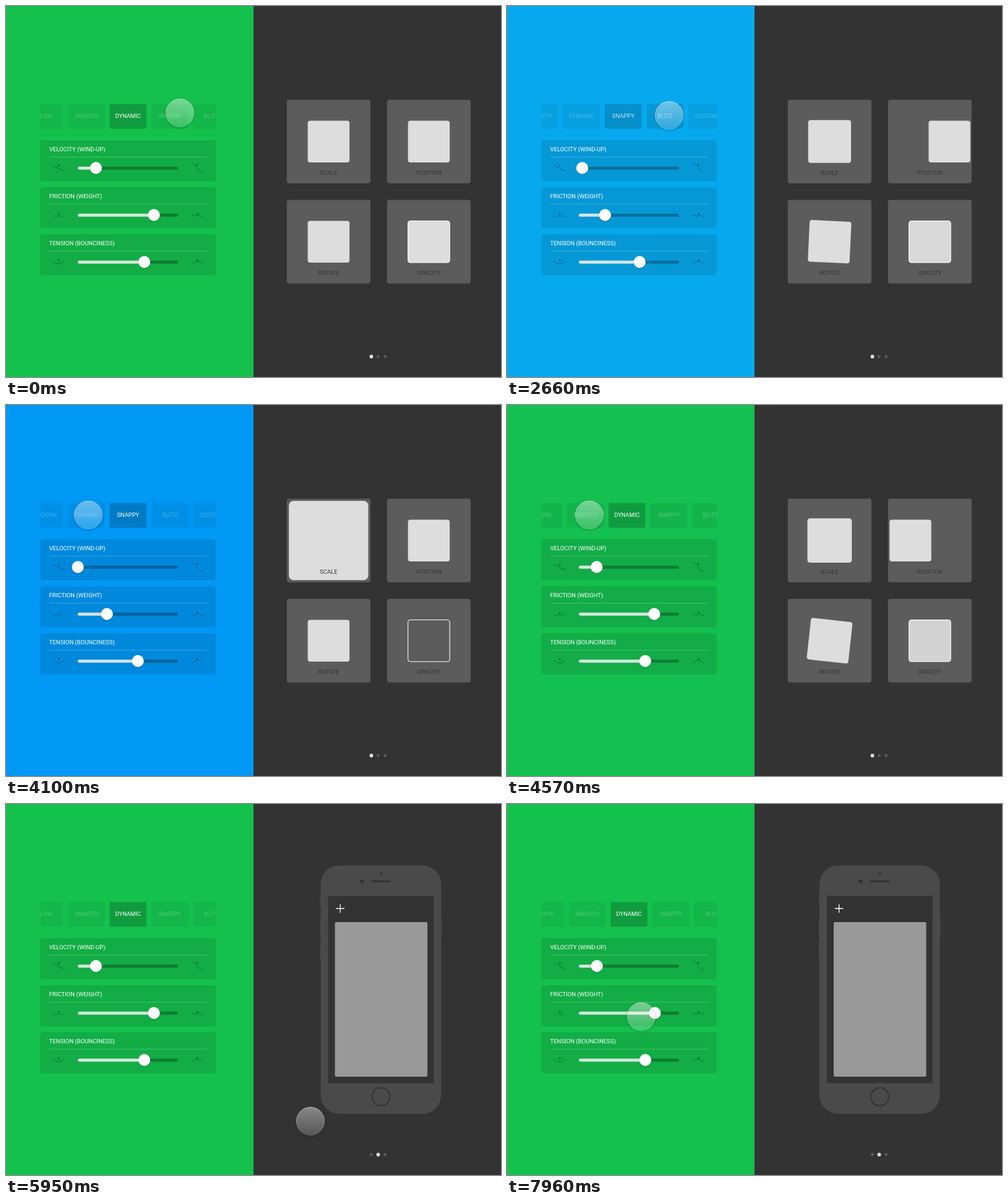
Animation of 800x600 px, one loop 8000 ms. Source, as an HTML page:

```html
<!DOCTYPE html>
<html lang="en">
<head>
<meta charset="utf-8">
<title>Spring presets</title>
<style>
html, body { margin: 0; width: 100%; height: 100%; overflow: hidden; background: #333; }
svg { display: block; width: 800px; height: 600px; }
text { font: 9.4px Roboto, Arial, sans-serif; }
.mid { text-anchor: middle; }
.icon { fill: none; stroke: #000; stroke-opacity: .36; stroke-width: .9; }
.icon circle { fill: #000; fill-opacity: .4; stroke: none; }
</style>
</head>
<body>
<svg id="stage" viewBox="0 0 800 600" xmlns="http://www.w3.org/2000/svg">
  <defs>
    <clipPath id="tabClip"><rect x="55.5" y="150" width="283.5" height="60"/></clipPath>
    <linearGradient id="glass" x1="0" y1="0" x2="0" y2="1">
      <stop offset="0" stop-color="#fff" stop-opacity=".42"/>
      <stop offset="1" stop-color="#fff" stop-opacity=".17"/>
    </linearGradient>
    <linearGradient id="rim" x1="0" y1="0" x2="0" y2="1">
      <stop offset="0" stop-color="#fff" stop-opacity=".5"/>
      <stop offset="1" stop-color="#fff" stop-opacity=".08"/>
    </linearGradient>
    <filter id="soft" x="-30%" y="-30%" width="160%" height="160%"><feGaussianBlur stdDeviation="1"/></filter>
  </defs>
  <rect width="800" height="600" fill="#333"/>
  <g id="cards"></g>
  <g id="phone">
    <path d="M504.5 150v16M504.5 184v30M504.5 221v29M700 184v30" stroke="#434343" stroke-width="2"/>
    <rect x="505" y="99.5" width="194.5" height="401.5" rx="30" fill="#4a4a4a"/>
    <rect x="517" y="148.5" width="170.7" height="303" fill="#333"/>
    <circle cx="603" cy="112.5" r="2.1" fill="#333"/>
    <circle cx="571.5" cy="125" r="3.3" fill="#333"/>
    <path d="M588 125h29" stroke="#333" stroke-width="3.2" stroke-linecap="round"/>
    <circle cx="602.3" cy="473.5" r="14.5" fill="none" stroke="#333" stroke-width="1.8"/>
    <rect id="sheet" rx="2" fill="#999"/>
    <path d="M529.8 169h13.6M536.6 162.2v13.6" stroke="#fff" stroke-width="1.3"/>
  </g>
  <g id="dots"></g>
  <rect id="panel" width="400" height="600"/>
  <g id="tabs" clip-path="url(#tabClip)"></g>
  <g id="sliders"></g>
  <g id="cursor">
    <circle cy="1.5" r="23" fill="none" stroke="#000" stroke-opacity=".22" stroke-width="1.5" filter="url(#soft)"/>
    <circle r="23" fill="url(#glass)"/>
    <circle r="22.5" fill="none" stroke="url(#rim)"/>
  </g>
</svg>
<script>
const LOOP = 8000, PITCH = 67.5, SQUARE = 67.5;
const $ = id => document.getElementById(id);

function add(parent, tag, attrs, text) {
  const el = document.createElementNS('http://www.w3.org/2000/svg', tag);
  set(el, attrs);
  if (text) el.textContent = text;
  parent.appendChild(el);
  return el;
}
function set(el, attrs) {
  for (const name in attrs) el.setAttribute(name, attrs[name]);
}
const mix = (a, b, k) => a + (b - a) * k;
const ease = k => k * k * (3 - 2 * k);

// Value of a stepped track: 0 before its start, last entry after its end.
function held(t, start, gap, values) {
  if (t < start) return 0;
  return values[Math.min(Math.floor((t - start) / gap), values.length - 1)];
}

const presets = {
  dynamic: { tab: 2, scroll: 0, knobs: [145.3, 239, 223.5], color: [20, 193, 77] },
  snappy: { tab: 3, scroll: 67.5, knobs: [116, 163, 213], color: [0, 152, 245] },
  blitz: { tab: 4, scroll: 90, knobs: [132.5, 149, 216.8], color: [26, 214, 221] }
};

// spring drives the demo squares, scroll the tab strip, blend the colours and sliders.
const snappyTracks = {
  spring: [.43, .95, 1.02, 1.02, 1.01, 1],
  scroll: [.275, .78, .96, .96, .99, 1],
  blend: [.21, .78, 1]
};
const switches = [
  { start: 1460, from: 'dynamic', to: 'snappy', x: [0, -1], ...snappyTracks },
  { start: 2660, from: 'snappy', to: 'blitz', x: [-1, 1],
    spring: [.97, 1.145, 1.02, .95, .99, 1.02, 1.005, 1], scroll: [.42, .9, 1], blend: [.33, .85, 1] },
  { start: 3540, from: 'blitz', to: 'snappy', x: [1, 0], ...snappyTracks },
  { start: 4370, from: 'snappy', to: 'dynamic', x: [0, -1],
    spring: [.15, .62, .93, 1.03, 1.02, 1.005, 1], scroll: [.16, .65, .95, 1], blend: [.16, .7, .985, 1] }
];

const moves = [
  { start: 90, steps: 2, gap: 120, to: [277, 176] },
  { start: 1810, steps: 4, gap: 110, to: [262, 177] },
  { start: 3070, steps: 4, gap: 100, to: [166, 178] },
  { start: 3900, steps: 3, gap: 100, to: [133, 178] },
  { start: 4680, steps: 4, gap: 100, to: [690, 508] },
  { start: 5160, steps: 10, gap: 87.7, to: [492, 513] },
  { start: 6040, steps: 4, gap: 86, to: [542, 174] },
  { start: 7520, steps: 6, gap: 88, to: [217, 344] }
];

const tabs = ['SLOW', 'SMOOTH', 'DYNAMIC', 'SNAPPY', 'BLITZ', 'CUSTOM'].map(name => {
  const group = add($('tabs'), 'g');
  return {
    group,
    box: add(group, 'rect', { x: -29.75, y: 158.5, width: 59.5, height: 40, rx: 2 }),
    label: add(group, 'text', { y: 181.4, class: 'mid', fill: '#fff' }, name)
  };
});

const icons = [
  ['M-9 -3C-3 -3 2 4 10 4', 'M-8 -7C0 -7 0 7 9 7', -4, -5],
  ['M-9 2h19', 'M-9 2q2 -3 4 -1t5 0t5 0t5 1', -1.5, -2],
  ['M-9 -1q9 8 18 0', 'M-9 3q9 -8 18 0', -3, -3]
];
const sliders = ['VELOCITY (WIND-UP)', 'FRICTION (WEIGHT)', 'TENSION (BOUNCINESS)'].map((name, i) => {
  const g = add($('sliders'), 'g', { transform: `translate(0 ${i * 76})` });
  add(g, 'rect', { x: 55.5, y: 217, width: 283.5, height: 66.5, rx: 3, 'fill-opacity': .1 });
  add(g, 'text', { x: 69.8, y: 235.2, fill: '#fff', style: 'font-size:9.5px' }, name);
  add(g, 'path', { d: 'M70 244.5H325', stroke: '#fff', 'stroke-opacity': .22 });
  [85, 309].forEach((x, side) => {
    const icon = add(g, 'g', { class: 'icon', transform: `translate(${x} 262)` });
    const line = add(icon, 'path', { d: icons[i][side] });
    if (i === 1 && side === 0) set(line, { 'stroke-dasharray': '2 1' });
    add(icon, 'circle', { cx: .3, cy: icons[i][2 + side], r: 1.4 });
  });
  add(g, 'rect', { x: 116, y: 259.8, width: 162, height: 5, rx: 2.5, 'fill-opacity': .27 });
  return {
    fill: add(g, 'rect', { x: 116, y: 259.8, height: 5, rx: 2.5, fill: '#fff', 'fill-opacity': .82 }),
    shadow: add(g, 'circle', { cy: 263, r: 9.7, 'fill-opacity': .22, filter: 'url(#soft)' }),
    knob: add(g, 'circle', { cy: 262, r: 9.7, fill: '#fff' })
  };
});

const squares = ['SCALE', 'POSITION', 'ROTATE', 'OPACITY'].map((name, i) => {
  const x = 521.4 + i % 2 * 162, y = 219.2 + (i >> 1) * 162;
  const g = add($('cards'), 'g', { transform: `translate(${x} ${y})` });
  add(g, 'rect', { x: -67.6, y: -67.6, width: 135.2, height: 135.2, rx: 4, fill: '#5c5c5c' });
  const square = add(g, 'rect', {
    x: -SQUARE / 2, y: -SQUARE / 2, width: SQUARE, height: SQUARE, rx: 4, fill: '#ddd'
  });
  add(g, 'text', { y: 54.2, class: 'mid', fill: '#333' }, name);
  return square;
});
set(squares[3], { stroke: '#fff', 'stroke-width': 1.1 });

const dots = [590.5, 601.5, 612.7].map(cx => add($('dots'), 'circle', { cx, cy: 567 }));

function drawPreset(t) {
  const index = switches.findLastIndex(s => t >= s.start);
  const s = switches[Math.max(index, 0)];
  const from = presets[s.from], to = presets[s.to];
  const [spring, scroll, blend] = ['spring', 'scroll', 'blend'].map(key => held(t, s.start, 100, s[key]));

  const tint = blend ** 1.15;
  set($('panel'), { fill: `rgb(${from.color.map((c, i) => Math.round(mix(c, to.color[i], tint)))})` });

  const offset = mix(from.scroll, to.scroll, scroll);
  tabs.forEach((tab, i) => {
    const active = i === from.tab ? 1 - blend : i === to.tab ? blend : 0;
    set(tab.group, { transform: `translate(${62.25 + PITCH * i - offset} 0)` });
    set(tab.box, { 'fill-opacity': mix(.06, .2, active) });
    set(tab.label, { 'fill-opacity': mix(.27, 1, active) });
  });

  sliders.forEach((slider, i) => {
    const x = mix(from.knobs[i], to.knobs[i], blend) + (s.from === 'dynamic' || s.to === 'dynamic' ? 0 : .1);
    set(slider.fill, { width: Math.max(x - 116, 0) });
    set(slider.knob, { cx: x });
    set(slider.shadow, { cx: x });
  });

  // Squares toggle between rest (0) and transformed (1) on every switch.
  const amount = index % 2 === 1 ? 1 - spring : spring;
  set(squares[0], { transform: `scale(${1 + .9 * amount})` });
  set(squares[1], { transform: `translate(${mix(s.x[0], s.x[1], spring) * 33.75} 0)` });
  set(squares[2], { transform: `rotate(${90 * amount})` });
  set(squares[3], { 'fill-opacity': Math.min(Math.max(1 - amount, 0), 1) });
}

function drawPages(t) {
  const page = held(t, 5160, 87.7,
    [.01, .05, .13, .24, .38, .55, .75, .9, .965, .991, .996, .998, 1]);
  set($('cards'), { transform: `translate(${-400 * page} 0)` });
  set($('phone'), { transform: `translate(${400 * (1 - page)} 0)`, visibility: page ? 'visible' : 'hidden' });
  dots.forEach((dot, i) => {
    const on = Math.max(1 - Math.abs(i - page), 0);
    const grey = Math.round(mix(92, 230, on));
    set(dot, { r: mix(2.4, 2.9, on), fill: `rgb(${grey},${grey},${grey})` });
  });

  const open = held(t, 6480, 86, [.1, .4, .75, .92, 1]) - held(t, 7430, 88, [.15, .6, .93, 1]);
  const grow = 8.5 * open;
  set($('sheet'), { x: 528 - grow, y: 191 - grow, width: 149.5 + 2 * grow, height: 250 + 2 * grow });
}

function drawCursor(t) {
  let x = 281, y = 173;
  for (const { start, steps, gap, to } of moves) {
    if (t < start) break;
    const k = ease(Math.min(Math.floor((t - start) / gap) + 1, steps) / steps);
    x = mix(x, to[0], k);
    y = mix(y, to[1], k);
  }
  set($('cursor'), { transform: `translate(${x} ${y})` });
}

function draw(t) {
  drawPreset(t);
  drawPages(t);
  drawCursor(t);
}

const began = performance.now();
function tick() {
  draw((performance.now() - began) % LOOP);
  requestAnimationFrame(tick);
}
tick();
</script>
</body>
</html>
```
